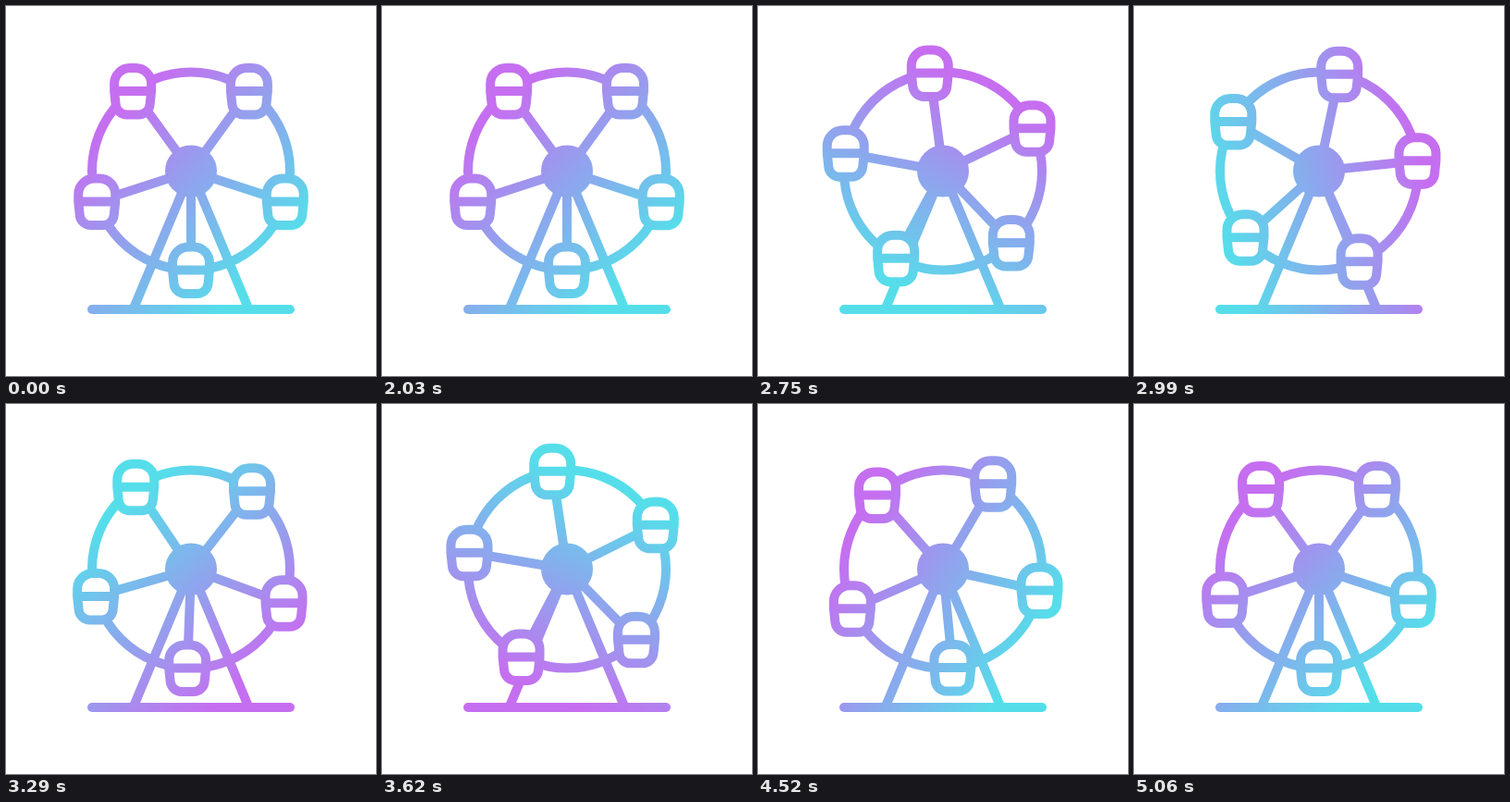
An HTML page that plays this animation: 400 px wide and 400 px high, repeating every 5.12 s.

```html
<!DOCTYPE html>
<html lang="en">
<head>
<meta charset="utf-8">
<title>Ferris wheel</title>
<style>
  html, body { margin: 0; width: 100%; height: 100%; overflow: hidden; background: #fff; }
  svg { display: block; width: 100vw; height: 100vh; }
</style>
</head>
<body>
<svg viewBox="0 0 400 400">
  <defs>
    <linearGradient id="paint" gradientUnits="userSpaceOnUse" x1="85" y1="198" x2="315" y2="198">
      <stop offset="0" stop-color="#c66ef0"/>
      <stop offset="1" stop-color="#55deea"/>
    </linearGradient>
    <!-- Black cabin interiors hide the ring, spokes and legs behind them. -->
    <path id="cabin" fill="#000" d="M-20 0V-8A17 17 0 0 1-3-25H3A17 17 0 0 1 20-8V0L18.5 14.5A12 12 0 0 1 6.5 25.5H-6.5A12 12 0 0 1-18.5 14.5ZH20"/>
    <mask id="shape" maskUnits="userSpaceOnUse" x="0" y="0" width="400" height="400">
      <g fill="none" stroke="#fff" stroke-width="10" stroke-linecap="round" stroke-linejoin="round">
        <path d="M93 328H307M137.500 328L200 178.500L262.500 328"/>
        <circle cx="200" cy="178.500" r="107"/>
        <path id="spokes"/>
        <circle cx="200" cy="178.500" r="23" fill="#fff"/>
        <g id="cabins"></g>
      </g>
    </mask>
  </defs>
  <rect width="400" height="400" fill="url(#paint)" mask="url(#shape)"/>
</svg>
<script>
const LOOP = 5120, START = 2000, SPAN = 3090, STEP = 30;
const CX = 200, CY = 178.5, RADIUS = 107;
const paint = document.getElementById('paint');
const spokes = document.getElementById('spokes');
const holder = document.getElementById('cabins');

const cabins = Array.from({ length: 5 }, () => {
  const use = document.createElementNS('http://www.w3.org/2000/svg', 'use');
  use.setAttribute('href', '#cabin');
  return holder.appendChild(use);
});

// Cubic bezier (0.333, 0, 0.426, 1), solved by bisection.
function ease(x) {
  let lo = 0, hi = 1, s;
  for (let i = 0; i < 30; i++) {
    s = (lo + hi) / 2;
    const r = 1 - s;
    if (3 * r * r * s * 0.333 + 3 * r * s * s * 0.426 + s ** 3 < x) lo = s; else hi = s;
  }
  return s * s * (3 - 2 * s);
}

function draw(time) {
  const elapsed = Math.floor((time % LOOP - START) / STEP) * STEP;
  const p = ease(Math.min(1, Math.max(0, elapsed / SPAN)));
  let d = '';
  cabins.forEach((cabin, i) => {
    const a = (90 + 72 * i + 144 * p) * Math.PI / 180;
    const x = CX + RADIUS * Math.cos(a), y = CY + RADIUS * Math.sin(a);
    d += `M${CX} ${CY}L${x} ${y}`;
    cabin.setAttribute('transform', `translate(${x} ${y})`);
  });
  spokes.setAttribute('d', d);
  paint.setAttribute('gradientTransform', `rotate(${45 + 360 * p} 200 198)`);
}

function tick() {
  draw(performance.now());
  requestAnimationFrame(tick);
}
tick();
</script>
</body>
</html>
```
